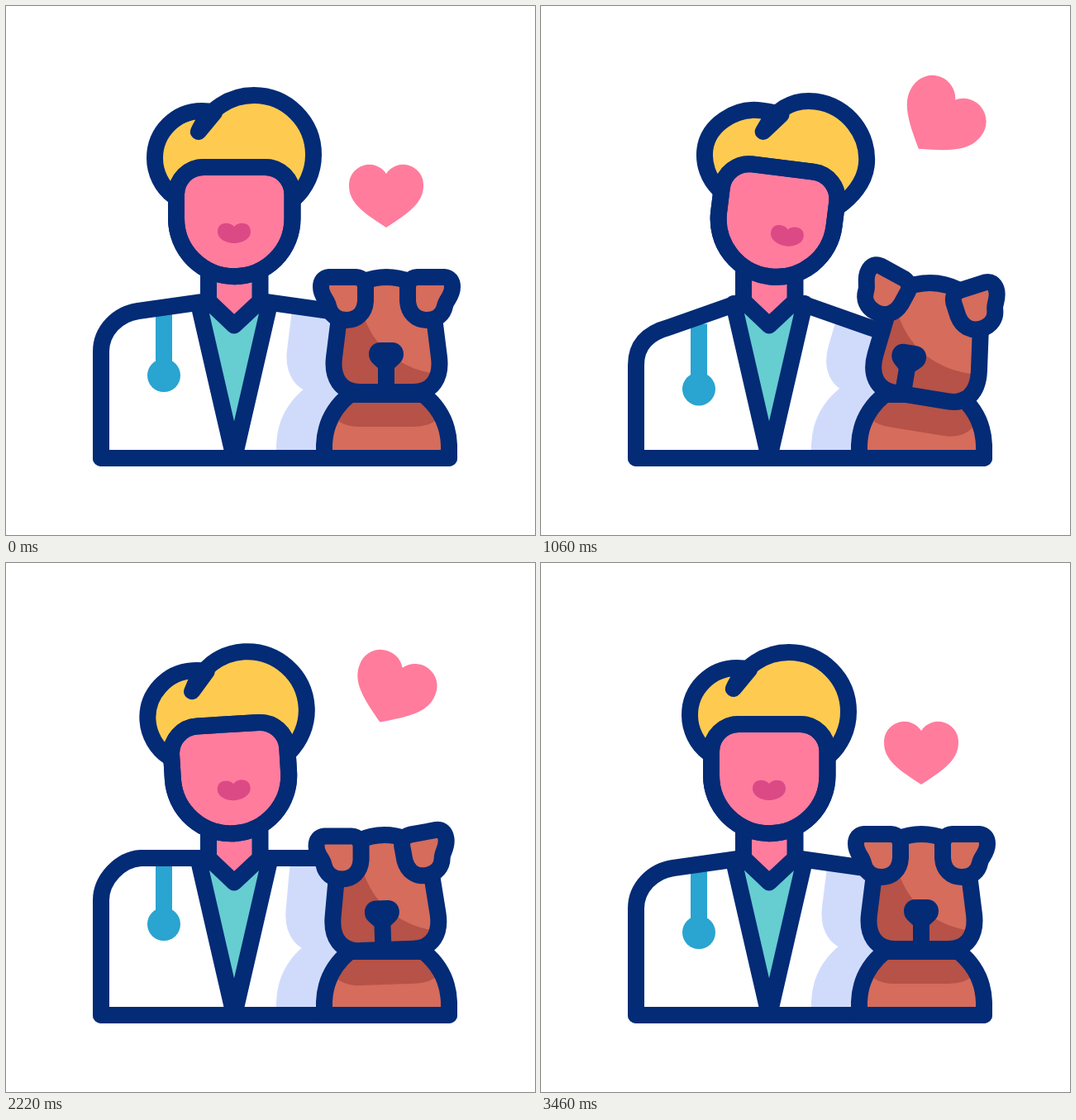
Write an HTML page that moves like this. It is 640 px wide and 640 px high and loops after 3.6 s.

```html
<!DOCTYPE html>
<html lang="en">
<head>
<meta charset="utf-8">
<title>Vet and dog</title>
<style>
  html, body { margin: 0; width: 100%; height: 100%; overflow: hidden; background: #fff; }
  svg { display: block; width: 100%; height: 100%; }
  .line { stroke: #032b76; stroke-width: 20; stroke-linejoin: round; stroke-linecap: round; fill: none; }
  .fur { fill: #d56c5c; }
  .dark { fill: #b65247; }
  .shade { fill: #d0dbfc; stroke: #d0dbfc; stroke-width: 20; stroke-linejoin: round; }
  .pink { fill: #ff7c9d; }
  .skin { fill: #febcb7; }
  .hair { fill: #fecb50; }
  .lips { fill: #dc4a86; }
  .steth { fill: #2aa4d0; }
  .scrubs { fill: #66cdd0; }
  .navy { fill: #032b76; }
</style>
</head>
<body>
<svg viewBox="0 0 640 640">
  <defs>
    <path id="skull" d="M402 385L397 425C394 450 405 467 428 467H493C516 467 527 450 524 425L519 385C516 355 506 338 490 334Q460 322 431 334C415 338 405 355 402 385Z"/>
    <path id="torso" d="M385 547V531C386 503 400 483 416 470H505C521 483 535 503 536 531V547Z"/>
    <path id="ear" d="M391 328H423Q436 329 435 344V357C434 371 425 380 412 380C400 380 392 373 390 363C389 356 381 351 381 340Q381 329 391 328Z"/>
    <clipPath id="inCoat"><path id="coatClip"/></clipPath>
    <clipPath id="inSkull"><use href="#skull"/></clipPath>
    <clipPath id="inTorso"><use href="#torso"/></clipPath>
  </defs>

  <g clip-path="url(#inCoat)">
    <use href="#torso" class="shade" x="-48"/>
    <g transform="translate(-47 -8)"><use href="#skull" class="shade" id="skullShade"/></g>
  </g>
  <g class="steth" id="steth">
    <path d="M181 368H201V447H181Z"/>
    <circle cx="191" cy="447" r="20"/>
  </g>
  <path class="scrubs" d="M234 362H318L276 547Z"/>
  <path class="pink" d="M245 310H307V357L276 386L245 357Z"/>
  <path id="coat" class="line"/>
  <path class="line" d="M245 315V357L276 386.5L307.5 357V315M233 360L276 547L319 360M115 547H536"/>

  <g id="head">
    <path id="hair" class="hair line" style="fill:#fecb50"/>
    <path class="pink" id="face" d="M206 228A33 33 0 0 1 239 195H313.5A33 33 0 0 1 346.5 228V257A70.25 70.25 0 0 1 206 257Z"/>
    <path class="skin" d="M206 257Q222 235 240 235H312Q330 235 346.5 257A70.25 70.25 0 0 1 206 257Z"/>
    <use href="#face" class="line" style="fill:none"/>
    <path class="line" d="M206 228A33 33 0 0 1 239 195H313.5A33 33 0 0 1 346.5 228V257A70.25 70.25 0 0 1 206 257Z"/>
    <path id="lips" class="lips" d="M276 267C280 261 296 260 296 273C296 282 285 287 276 287C267 287 256 282 256 273C256 260 272 261 276 267Z"/>
  </g>

  <use href="#torso" class="fur"/>
  <g clip-path="url(#inTorso)">
    <path id="chinShade" class="dark" d="M390 460H531V485Q523 509 493 509H428Q398 509 390 485Z"/>
  </g>
  <use href="#torso" class="line"/>
  <g id="dog">
    <use href="#skull" class="fur"/>
    <g clip-path="url(#inSkull)">
      <path id="cheek" class="dark" d="M432 372C440 402 468 438 520 445L560 447V500H360V350Z"/>
    </g>
    <use href="#skull" class="line"/>
    <path id="nose" class="navy" d="M453 407H467C475 407 481 413 481 421C481 430 475 433 470 438V465H450V438C445 433 439 430 439 421C439 413 445 407 453 407Z"/>
    <g id="earL"><use href="#ear" class="line" style="fill:#d56c5c"/></g>
    <g id="earR"><use href="#ear" class="line" style="fill:#d56c5c" transform="translate(921 0) scale(-1 1)"/></g>
  </g>

  <path id="heart" class="pink" d="M0 -27A24.5 24.5 0 0 1 45 -13C45 8 28 20 0 38C-28 20 -45 8 -45 -13A24.5 24.5 0 0 1 0 -27Z"/>
</svg>
<script>
const LOOP = 3600;
const times = [0, 540, 1080, 1660, 1940, 2220, 2560, 3020, 3130, 3460];
const tracks = {
  head:   [0, 6.6, 7.1, 7.2, 7.2, -3.5, -5.7, 0, 0, 0],
  look:   [0, 13, 15.5, 16, 16, 3, 0, 0, 0, 0],
  drop:   [0, 10, 16.5, 18, 18, -10, 0, 0, 0, 0],
  dog:    [0, 7.6, 9.3, 9.5, 9.8, -2, -4, 1.2, 2.3, 0],
  sink:   [0, 5, 6, 6, 6, 1, 0, 0, 0, 0],
  sniff:  [0, 18, 22.5, 23, 23, 3.5, 0, 0, 0, 0],
  earL:   [0, .8, .97, 1, 1, .1, -.05, 0, 0, 0],
  earR:   [0, .85, .97, 1, 1, .3, .25, 0, 0, 0],
  heartX: [460, 470, 483, 487, 489, 468.3, 455.2, 461, 461, 460],
  heartY: [230, 150.3, 138, 135.5, 131, 154, 213.2, 233.4, 233.5, 230],
  heartA: [0, 27, 37, 39, 41, 22.5, -3.5, -7.7, -7.3, 0],
  heartS: [1, 1.07, 1.14, 1.165, 1.19, 1.095, .965, .955, .96, 1]
};

const $ = id => document.getElementById(id);
const move = (id, value) => $(id).setAttribute('transform', value);
const draw = (id, d) => $(id).setAttribute('d', d);

// Monotone cubic: flat at turning points, smooth elsewhere.
const slope = (v, i) => (v[i + 1] - v[i]) / (times[i + 1] - times[i]);
function tangent(v, i) {
  if (i === 0 || i === times.length - 1) return 0;
  const a = slope(v, i - 1), b = slope(v, i);
  return a * b > 0 ? 2 * a * b / (a + b) : 0;
}
function sample(v, t) {
  const last = times.length - 1;
  if (t >= times[last]) return v[last];
  let i = 0;
  while (t >= times[i + 1]) i++;
  const h = times[i + 1] - times[i], u = (t - times[i]) / h, w = 1 - u;
  return v[i] * (1 + 2 * u) * w * w + v[i + 1] * u * u * (3 - 2 * u)
    + h * u * w * (tangent(v, i) * w - tangent(v, i + 1) * u);
}

function coatPath(s) {
  const x = 160 - .3 * s, y = 369 + 1.2 * s;
  const bx = x - 25, by = 372.5 + 1.4 * s, cy = 393 + s, ey = 418 + s;
  return `M245 357L${x} ${y}C${bx} ${by} 115 ${cy} 115 ${ey}V547H437V${ey}` +
    `C437 ${cy} ${552 - bx} ${by} ${552 - x} ${y}L307 357`;
}

function hairPath(p) {
  const q = .15 * p, c = .4 * p, r = .3 * p;
  return `M203 230C188.6 219.3 180 202 180 184C180 ${152.5 + q} ${205.5 + r} ${127 + q} ${237 + r} ${127 + q}` +
    `Q${245 + p} ${127 + q} ${252 + p} ${129 + q}L${233 + p} ${152 + q}` +
    `C${244.3 + .9 * p} ${125.4 + q} ${271 + c} ${108 + q} ${300 + c} ${108 + q}` +
    `C${339.8 + r} ${108 + q} ${372 + r} ${140.2 + q} ${372 + r} 180C${372 + r} 200.7 363.1 220.3 347.6 234`;
}

function render(t) {
  const k = {};
  for (const name in tracks) k[name] = sample(tracks[name], t);

  draw('coat', coatPath(k.drop));
  draw('coatClip', coatPath(k.drop));
  move('steth', `translate(0 ${k.drop})`);

  move('head', `rotate(${k.head} 276 327)`);
  draw('hair', hairPath(.92 * k.look));
  move('lips', `translate(${k.look} ${.08 * k.look})`);

  const tilt = `translate(0 ${k.sink}) rotate(${k.dog} 460 467)`;
  for (const id of ['dog', 'skullShade', 'chinShade']) move(id, tilt);
  move('cheek', `rotate(${-k.dog} 460 467) translate(0 ${-k.sink})`);
  move('nose', `translate(${-k.sniff} 0)`);
  move('earL', `translate(${-14.5 * k.earL} ${-5.5 * k.earL}) rotate(${20 * k.earL} 408 352)`);
  move('earR', `translate(${-3 * k.earR} ${-5 * k.earR}) rotate(${-28 * k.earR} 512 352)`);

  move('heart', `translate(${k.heartX} ${k.heartY}) rotate(${k.heartA}) scale(${k.heartS})`);
}

let start;
function tick(now) {
  start ??= now;
  render((now - start) % LOOP);
  requestAnimationFrame(tick);
}
render(0);
requestAnimationFrame(tick);
</script>
</body>
</html>
```
